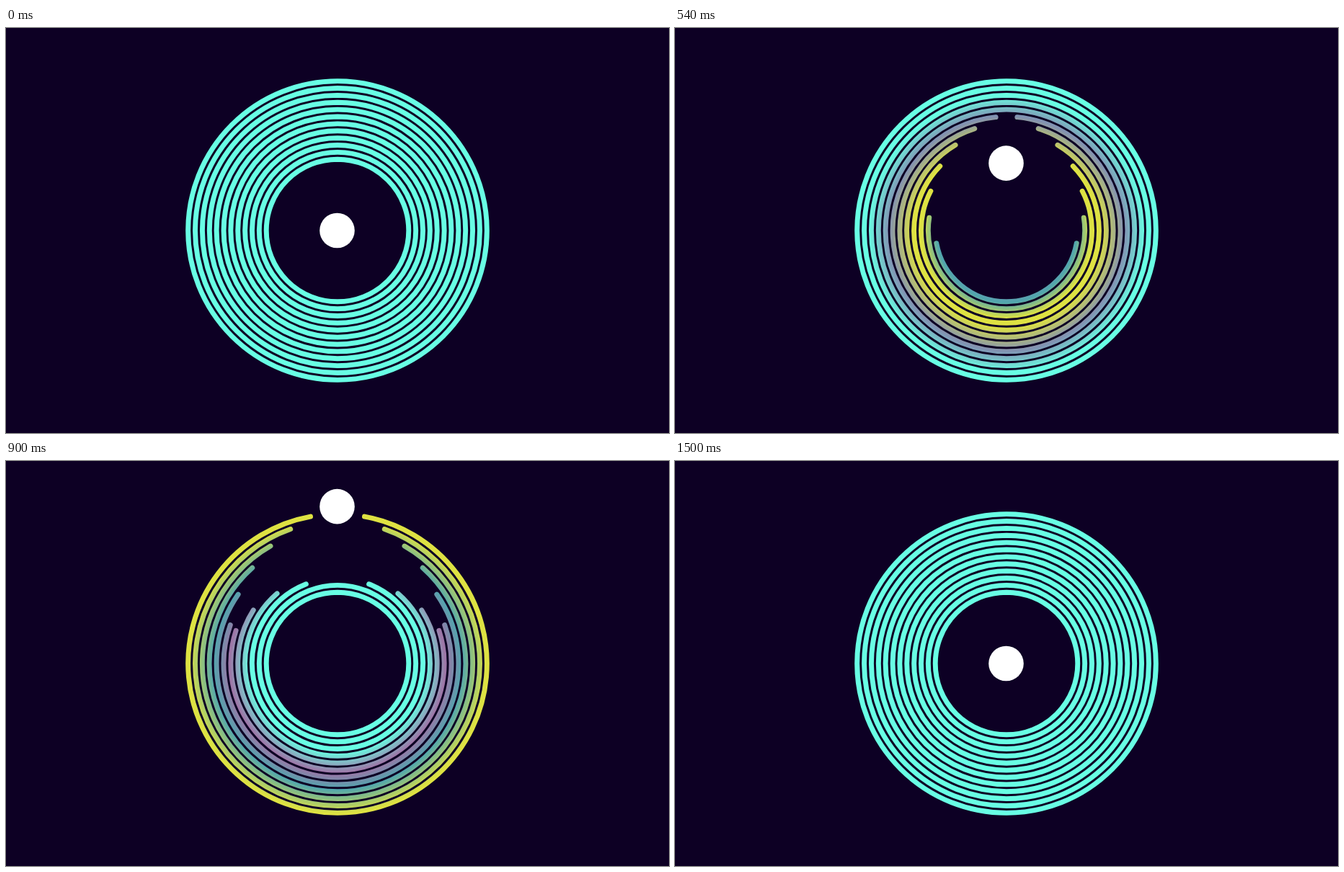
Write an HTML page that moves like this. It is 920 px wide and 562 px high and loops after 1800 ms.

```html
<!DOCTYPE html>
<html lang="en">
<head>
<meta charset="utf-8">
<title>Ripple rings</title>
<style>
  html, body { margin: 0; width: 100%; height: 100%; overflow: hidden; background: #0d0024; }
  svg { display: block; width: 100%; height: 100%; }
</style>
</head>
<body>
<svg viewBox="0 0 920 562">
  <defs>
    <radialGradient id="glow" gradientUnits="userSpaceOnUse" cx="460" cy="281" r="400"></radialGradient>
  </defs>
  <g id="rings" fill="none" stroke="url(#glow)" stroke-width="6.9" stroke-linecap="round"></g>
  <circle id="ball" cx="459.5" cy="281" r="24.3" fill="#fff"/>
</svg>
<script>
const LOOP = 1800, STEP = 30, COUNT = 12;
const CX = 460, CY = 281, INNER = 98.8, GAP = 9.87, SPAN = 400;
const BALL = 24.3;

const byId = id => document.getElementById(id);
const glow = byId('glow'), ball = byId('ball');
const clamp = x => Math.max(0, Math.min(1, x));
const mix = (a, b, k) => a + (b - a) * k;

function add(parent, tag) {
  const el = document.createElementNS('http://www.w3.org/2000/svg', tag);
  return parent.appendChild(el);
}

// Radii of the colour stops at each key time, inside to outside
const TIMES = [180, 300, 540, 780, 1020, 1260];
const BANDS = [
  { color: [104, 255, 228], radii: [5, 12, 40, 97, 145, 214] },
  { color: [148, 134, 181], late: [168, 98, 150], radii: [12, 25, 68, 124, 176, 255] },
  { color: [80, 166, 174], radii: [18, 38, 96, 146, 199, 280] },
  { color: [222, 226, 66], radii: [26, 54, 118, 172, 240, 320] },
  { color: [222, 226, 66], radii: [30, 60, 130, 192, 265, 340] },
  { color: [130, 145, 178], radii: [48, 83, 163, 226, 300, 365] },
  { color: [104, 255, 228], radii: [62, 106, 192, 260, 340, 395] }
];
const SHIFT = [6, 6, 4, 4, 0, 0];

function keyed(values, t) {
  if (t <= TIMES[0]) return values[0];
  for (let i = 1; i < TIMES.length; i++) {
    if (t <= TIMES[i]) {
      return mix(values[i - 1], values[i], (t - TIMES[i - 1]) / (TIMES[i] - TIMES[i - 1]));
    }
  }
  return values[values.length - 1];
}

for (const band of BANDS) band.stop = add(glow, 'stop');
const rings = Array.from({ length: COUNT }, () => add(byId('rings'), 'path'));

// Half of the opening at the top of a ring, in radians
function opening(i, t) {
  const age = t - 150 - 60 * i;
  const peak = Math.PI * (0.6 - 0.03 * i);
  return peak * clamp(age < 420 ? age / 420 : (690 - age) / 270);
}

function ringPath(r, angle) {
  const dx = r * Math.sin(angle), y = CY - r * Math.cos(angle);
  const arc = `A${r} ${r} 0 0 1 `;
  return `M${CX + dx} ${y}${arc}${CX} ${CY + r}${arc}${CX - dx} ${y}`;
}

function draw(t) {
  rings.forEach((ring, i) => {
    ring.setAttribute('d', ringPath(INNER + GAP * i, opening(i, t)));
  });

  const tint = clamp((t - 780) / 240);
  for (const { color, late = color, radii, stop } of BANDS) {
    stop.setAttribute('offset', keyed(radii, t) / SPAN);
    stop.setAttribute('stop-color', `rgb(${color.map((c, k) => Math.round(mix(c, late[k], tint)))})`);
  }
  glow.setAttribute('cy', CY + keyed(SHIFT, t));

  const rising = t < 1170;
  ball.setAttribute('cy', rising ? CY - 0.3458 * Math.max(0, t - 270) : CY);
  ball.setAttribute('r', rising ? BALL : BALL * clamp((t - 1185) / 117));
}

const start = performance.now();
function tick() {
  const t = (performance.now() - start) % LOOP;
  draw(Math.floor(t / STEP) * STEP);
  requestAnimationFrame(tick);
}
tick();
</script>
</body>
</html>
```
